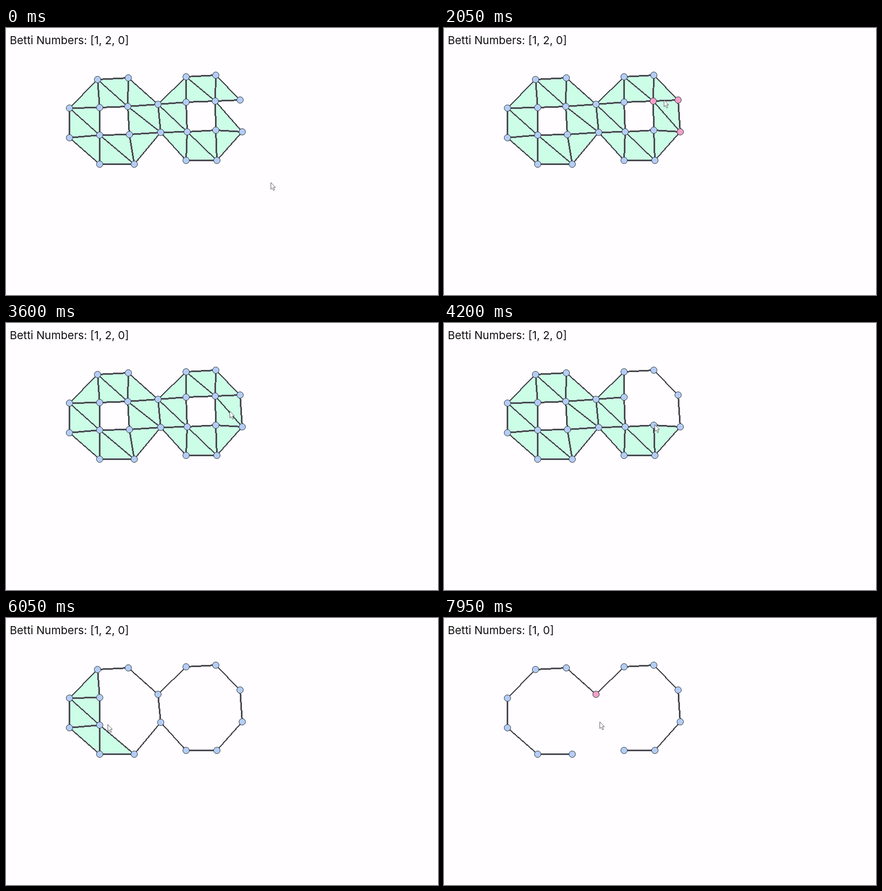
These frames come from a looping animation (800 px wide and 495 px high, 8 s). An HTML page:

```html
<!DOCTYPE html>
<html lang="en">
<head>
<meta charset="utf-8">
<title>Betti Numbers</title>
<style>
  html, body { margin: 0; width: 100%; height: 100%; overflow: hidden; background: #fffdff; }
  svg { display: block; width: 100%; height: 100%; }
  text { font: 400 20.4px Inter, "Open Sans", sans-serif; fill: #111; }
  .face { fill: #ccfde6; }
  .edge { stroke: #4b4b52; shape-rendering: crispEdges; }
  .node { fill: #b3cdf6; stroke: #34363e; stroke-width: 1; }
  .node.on { fill: #f2a0c8; }
  #cursor { fill: #fff; stroke: #66666c; stroke-width: 1; }
</style>
</head>
<body>
<svg viewBox="0 0 800 495">
  <text id="label" x="7" y="29.5"></text>
  <g id="scene" transform="translate(.5 .5)"></g>
  <path id="cursor" d="M.5 .5V13L3.2 10.4L5.4 15.3L7.4 14.4L5.3 9.6H9Z"/>
</svg>
<script>
const LOOP = 8000, STEP = 50, PAUSE = 40;
const scene = document.getElementById('scene');
const label = document.getElementById('label');
const cursor = document.getElementById('cursor');

// The vertices, and the triangles that carry all edges
const points = {
  A: [169, 95], B: [226, 92], C: [333, 90], D: [388, 87],
  E: [117, 148], F: [173, 147], G: [225, 145], H: [281, 141],
  I: [333, 137], J: [387, 135], K: [433, 133], L: [117, 203],
  M: [173, 198], N: [228, 197], O: [286, 193], P: [335, 192],
  Q: [388, 189], R: [437, 192], S: [173, 252], T: [237, 252],
  U: [333, 245], V: [390, 245]
};
const triangles = ('EAF AFG ABG BGH EFM EML LMS MST MNT NTO GHO GNO ' +
  'HCI CIJ CDJ DJK HOP HIP OPU PUV PQV QVR JQR JKR').split(' ');

// What the user does: pick toggles a vertex, cut deletes a simplex
const actions = [];
function act(time, at, verb, key = at) {
  actions.push({ time, verb, key, pos: points[at] || at });
}
act(0, [488, 287]);
act(450, 'R', 'pick');
act(800, 'J', 'pick');
act(1200, [447, 136]);
act(1400, 'K', 'pick');
act(1600, 'K', 'fill', 'JKR');
act(2400, 'J', 'pick');
act(2950, 'K', 'pick');
act(3350, 'R', 'pick');
[...'JQPIGNMF'].forEach((key, i) => act(3850 + 390 * i, key, 'cut'));
act(7000, [298, 204]);
act(7250, 'H', 'pick');
act(7500, 'O', 'pick');
act(7650, 'O', 'cut', 'HO');
act(7900, 'O', 'cut');

function add(tag, cls, key, attrs) {
  const el = document.createElementNS('http://www.w3.org/2000/svg', tag);
  el.setAttribute('class', cls);
  for (const name in attrs) el.setAttribute(name, attrs[name]);
  scene.append(el);
  return { key, el };
}

const faces = triangles.map(key =>
  add('polygon', 'face', key, { points: [...key].map(k => points[k]).join(' ') }));

const pairs = new Set(triangles.flatMap(([a, b, c]) =>
  [[a, b], [b, c], [a, c]].map(pair => pair.sort().join(''))));
const edges = [...pairs].map(key => {
  const [[x1, y1], [x2, y2]] = [...key].map(k => points[k]);
  const dx = Math.abs(x2 - x1), dy = Math.abs(y2 - y1);
  // Three pixels across the steeper axis, so diagonals look thinner
  const width = 3 * Math.max(dx, dy) / Math.hypot(dx, dy);
  return add('line', 'edge', key, { x1, y1, x2, y2, 'stroke-width': width });
});

const nodes = Object.entries(points).map(([key, [cx, cy]]) =>
  add('circle', 'node', key, { cx, cy, r: 6 }));

const contains = (key, part) => [...part].every(k => key.includes(k));

function stateAt(t) {
  const picked = new Set(), cut = [];
  let filled = false;
  for (const { time, verb, key } of actions) {
    if (time > t) break;
    if (verb === 'pick' && !picked.delete(key)) picked.add(key);
    if (verb === 'fill') filled = true;
    if (verb === 'cut') cut.push(key);
  }
  const alive = key => (filled || !contains(key, 'KR')) &&
    !cut.some(part => contains(key, part));
  return { picked, alive };
}

// Betti numbers by dimension, with trailing dimensions dropped
function betti(alive) {
  const count = list => list.filter(({ key }) => alive(key)).length;
  const [v, e, f] = [nodes, edges, faces].map(count);
  const holes = 1 - (v - e + f);
  return f ? [1, holes, 0] : [1, holes];
}

function cursorAt(t) {
  const i = actions.findIndex(a => a.time > t);
  const to = actions.at(i), from = i < 0 ? to : actions[i - 1];
  const span = to.time - from.time - 2 * PAUSE;
  const u = span > 0 ? Math.min(1, Math.max(0, (t - from.time - PAUSE) / span)) : 1;
  const ease = u * u * (3 - 2 * u);
  return from.pos.map((p, k) => Math.round(p + (to.pos[k] - p) * ease) + [2, -1][k]);
}

function render(t) {
  const { picked, alive } = stateAt(t);
  for (const { key, el } of [...faces, ...edges, ...nodes]) {
    el.style.display = alive(key) ? '' : 'none';
    el.classList.toggle('on', picked.has(key));
  }
  label.textContent = `Betti Numbers: [${betti(alive).join(', ')}]`;
  cursor.setAttribute('transform', `translate(${cursorAt(t)})`);
}

const start = performance.now();
function tick() {
  const t = (performance.now() - start) % LOOP;
  render(Math.floor(t / STEP) * STEP);
  requestAnimationFrame(tick);
}
tick();
</script>
</body>
</html>
```
